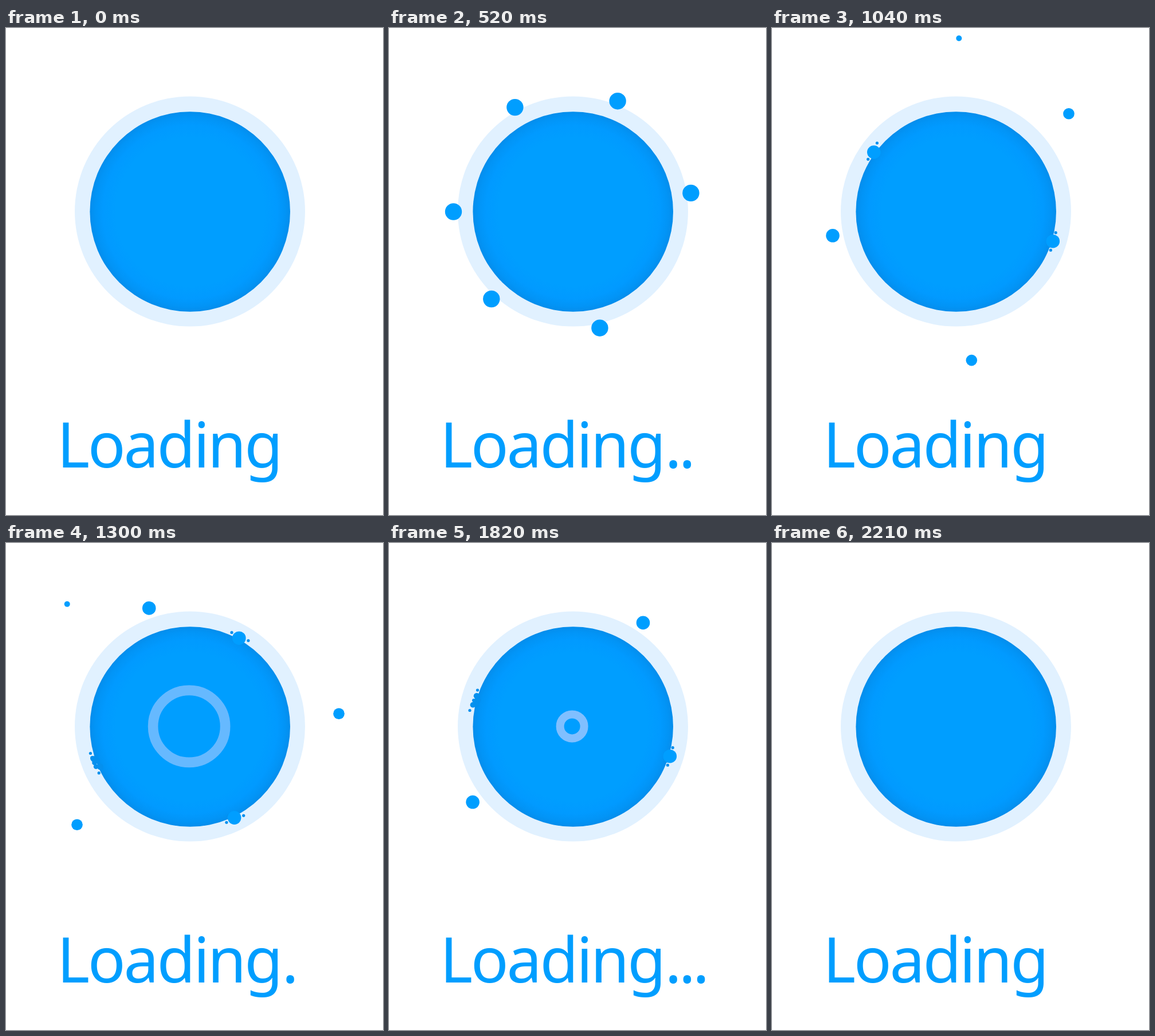
An HTML page that plays this animation: 658 by 851 pixels, repeating every 2.34 s.

```html
<!DOCTYPE html>
<html lang="en">
<head>
<meta charset="utf-8">
<title>Loading</title>
<style>
  html, body { margin: 0; width: 100%; height: 100%; overflow: hidden; background: #fff; }
  svg { display: block; width: 658px; height: 851px; }
  text { font: 109px "Noto Sans", "Open Sans", sans-serif; fill: #009eff; }
</style>
</head>
<body>
<svg viewBox="0 0 658 851">
  <defs>
    <radialGradient id="shade">
      <stop offset=".74" stop-color="#009eff"/>
      <stop offset=".87" stop-color="#019aff"/>
      <stop offset=".95" stop-color="#0294f6"/>
      <stop offset="1" stop-color="#048dec"/>
    </radialGradient>
  </defs>
  <circle cx="321" cy="320.5" r="201" fill="#e1f1ff"/>
  <circle cx="321.2" cy="321" r="174.8" fill="url(#shade)"/>
  <circle id="ring" cx="319.6" cy="320.4" fill="none" stroke="#ffe1ff"/>
  <g id="splashes" fill="#0590ee"></g>
  <g id="drops" fill="#009eff"></g>
  <text x="89" y="768" letter-spacing="-3.25">Loading</text>
  <text id="dots" x="481.5" y="768" letter-spacing="-5"></text>
</svg>
<script>
const STEP = 130, STEPS = 18;
const CENTER = 321, RIM = 177, START = 303;
const TURN = 10; // degrees a drop circles per step

const $ = id => document.getElementById(id);
const ring = $('ring'), splashes = $('splashes'), drops = $('drops'), dots = $('dots');

// step a wave appears: angles at which its drops land
const waves = {
  1: [19, 78, 129, 190, 237, 293],
  5: [144, 343],
  6: [201],
  7: [61, 296],
  8: [119],
  9: [25, 241],
  10: [165],
  11: [343],
  12: [66, 227]
};
const ripples = [5, 9, 14];

function random(seed) {
  return () => {
    seed = (seed * 16807 + 11) % 2147483647;
    return seed / 2147483647;
  };
}

function circle(deg, dist, r) {
  const a = deg * Math.PI / 180;
  const x = CENTER + dist * Math.cos(a), y = CENTER - dist * Math.sin(a);
  return `<circle cx="${x.toFixed(1)}" cy="${y.toFixed(1)}" r="${r.toFixed(1)}"/>`;
}

// Spirals inwards at a steady rate and grows to full size one step before landing.
function drop(land, age, flight, size) {
  const dist = START + (RIM - START) * age / flight;
  const grown = Math.sin(Math.PI / 2 * Math.min(1, age / (flight - 1)));
  return circle(land - TURN * (flight - age), dist, 5 + (size - 5) * grown);
}

// A clump on the rim with a stray speck on either side.
function splash(land, spread) {
  const rnd = random(land * 7919);
  const bit = (along, out, r) => circle(land + along * spread, RIM + out, r);
  let s = bit(-6, rnd() * 6, 2.6) + bit(6, rnd() * 6, 2.6);
  for (let i = 0; i < 7; i++) s += bit(rnd() * 7 - 3.5, rnd() * 8 - 6, 3 + rnd() * 2.5);
  return s;
}

function draw(step) {
  let dropMarkup = '', splashMarkup = '';
  for (const [birth, lands] of Object.entries(waves)) {
    const opening = lands.length > 2;
    const flight = opening ? 4 : 3, size = opening ? 14.7 : 11.8;
    const age = step - birth;
    if (age < 0 || age > flight + 1) continue;
    for (const land of lands) {
      if (age <= flight) dropMarkup += drop(land, age, flight, size);
      if (age >= flight) splashMarkup += splash(land, age > flight ? 1 : .85);
    }
  }
  drops.innerHTML = dropMarkup;
  splashes.innerHTML = splashMarkup;

  const age = Math.min(...ripples.map(s => step - s).filter(a => a >= 0));
  const visible = age < 3;
  ring.setAttribute('r', visible ? 21 + 42 * age : 0);
  ring.setAttribute('stroke-width', visible ? 14 + 3.7 * age : 0);
  ring.setAttribute('stroke-opacity', visible ? .5 - .1 * age : 0);

  dots.textContent = '.'.repeat((step >> 1) % 4);
}

let shown = -1;
const begin = performance.now();
function tick() {
  const step = Math.floor((performance.now() - begin) / STEP) % STEPS;
  if (step !== shown) draw(shown = step);
  requestAnimationFrame(tick);
}
tick();
</script>
</body>
</html>
```
